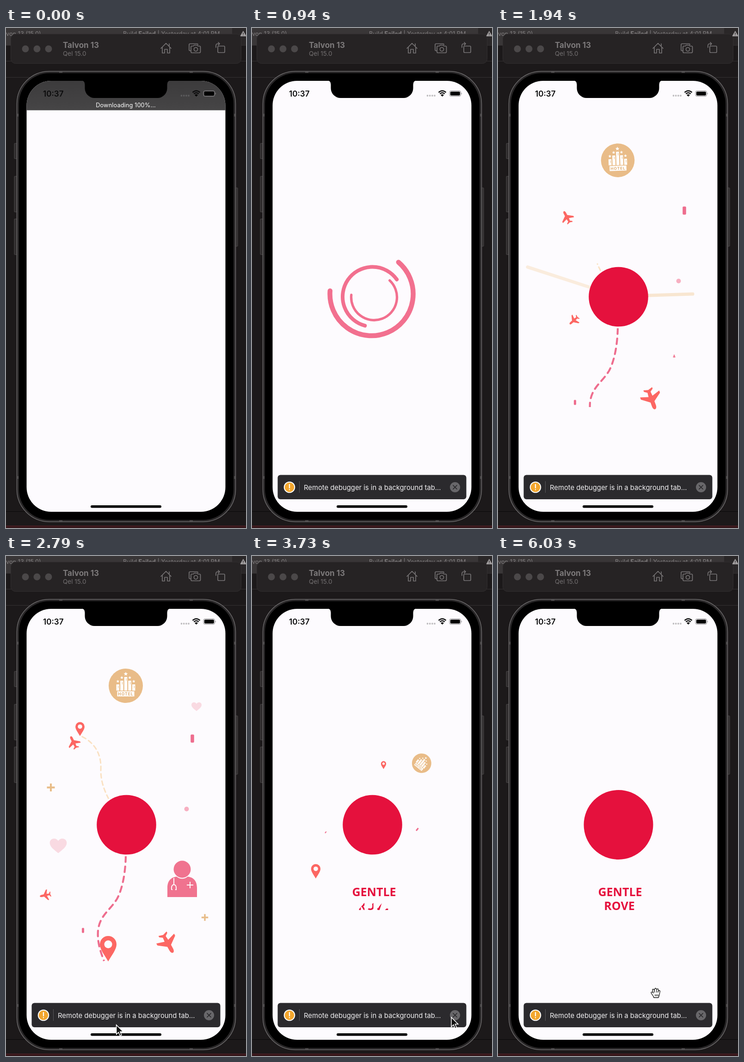
An HTML page for the animation above (6.09 s loop, 519 px wide and 1079 px high).

```html
<!DOCTYPE html>
<html lang="en">
<head>
<meta charset="utf-8">
<title>Splash animation</title>
<style>
  html, body { margin: 0; width: 100%; height: 100%; overflow: hidden; background: #1c191a; }
  svg { display: block; width: 100%; height: 100%; font-family: Inter, Roboto, sans-serif; }
  .brand { font: 700 25px "Open Sans", "Noto Sans", sans-serif; fill: #e5113d; text-anchor: middle; }
</style>
</head>
<body>
<svg viewBox="0 0 519 1079">
  <defs>
    <clipPath id="screen"><rect id="glass" x="44.500" y="114" width="430" height="930" rx="53"/></clipPath>
    <clipPath id="wipe"><path id="wipePath"/></clipPath>
    <mask id="sandMask" maskUnits="userSpaceOnUse" x="0" y="0" width="519" height="1079">
      <path id="sandCut"/>
    </mask>
    <mask id="pinkMask" maskUnits="userSpaceOnUse" x="0" y="0" width="519" height="1079">
      <path id="pinkCut"/>
    </mask>
    <path id="plane" fill="#fc6763" d="M0-23C3-23 4.500-19 4.500-15V-6L22 7V12L4.500 6.500 3.500 16 10 20.500V24L0 21-10 24V20.500L-3.500 16-4.500 6.500-22 12V7L-4.500-6V-15C-4.500-19-3-23 0-23Z"/>
    <path id="pin" fill="#fc6763" fill-rule="evenodd" d="M0 0C-8-14-18-26-18-37A18 18 0 0 1 18-37C18-26 8-14 0 0ZM0-45.500a8.500 8.500 0 1 0 .1 0Z"/>
    <path id="heart" fill="#f9dae2" d="M0 16C-8 9-18 3-18-6C-18-15-6-19 0-10C6-19 18-15 18-6C18 3 8 9 0 16Z"/>
    <path id="plus" fill="#e8bc88" d="M-2-8.500H2V-2H8.500V2H2V8.500H-2V2H-8.500V-2H-2Z"/>
    <linearGradient id="bar" x2="0" y2="1"><stop stop-color="#3c3b3c"/><stop offset="1" stop-color="#464546"/></linearGradient>
  </defs>

  <!-- desktop -->
  <rect width="519" height="1079" fill="#1c191a"/>
  <rect width="489" height="37" fill="#393637"/>
  <rect x="489" width="30" height="37" fill="#2a2728"/>
  <path d="M0 37.500H519M0 71.500H519M0 106.500H519" stroke="#343132"/>
  <path d="M0 1043.500H519" stroke="#090808"/>
  <rect y="1074" width="519" height="5" fill="#35161a"/>
  <path d="M0 1074.500H519" stroke="#5a2228"/>
  <g font-size="12.800" fill="#858283">
    <text x="0" y="17">von 13 (15.0)</text>
    <text x="253" y="17">Build <tspan font-weight="700">Failed</tspan> | Yesterday at 4:01 PM</text>
  </g>
  <path d="M513 6L520 18H506Z" fill="#a09d9e"/>
  <path d="M513 10V14M513 15.500V16.500" stroke="#2a2728" stroke-width="1.300"/>
  <rect x="10.500" y="13" width="498" height="63.500" rx="10" fill="#262324" stroke="#322f30"/>
  <g fill="#4b4849"><circle cx="42" cy="45" r="7.500"/><circle cx="67" cy="45" r="7.500"/><circle cx="92" cy="45" r="7.500"/></g>
  <text x="123" y="42.500" font-size="17" font-weight="700" fill="#7c797a">Talvon 13</text>
  <text x="123" y="60" font-size="13.500" fill="#737071">Qel 15.0</text>
  <g fill="none" stroke="#777475" stroke-width="1.700" stroke-linejoin="round" stroke-linecap="round">
    <path d="M335 44L346 33L357 44M338 42V54H343V46H349V54H354V42M353 39V34"/>
    <path d="M399 49H398Q396 49 396 47V36Q396 34 398 34H413Q415 34 415 36M402 39H405L407 37H413L415 39H418Q420.500 39 420.500 41V51Q420.500 53.500 418 53.500H402Q400 53.500 400 51V41Q400 39 402 39Z"/>
    <circle cx="410.500" cy="46" r="4"/>
    <path d="M460 39H471Q473 39 473 41V51Q473 53 471 53H460Q458 53 458 51V41Q458 39 460 39ZM454 42V38Q454 34 458 34H462M459 31L462 34L459 37"/>
  </g>

  <!-- phone -->
  <g fill="#2f2c2d" stroke="#575455" stroke-width=".8">
    <rect x="18" y="249" width="7" height="33" rx="1"/><rect x="18" y="320" width="7" height="77" rx="1"/>
    <rect x="18" y="412" width="7" height="77" rx="1"/><rect x="494" y="345" width="7" height="126" rx="1"/>
  </g>
  <rect x="23.500" y="93.500" width="473" height="972" rx="70" fill="#282627" stroke="#6c6a6b" stroke-width="1.500"/>
  <path d="M115 95.500H122M397 95.500H404M115 1063.500H122M397 1063.500H404M25.500 185V191M494.500 185V191M25.500 967V973M494.500 967V973" stroke="#494748" stroke-width="3"/>
  <rect x="28" y="97.500" width="464" height="964" rx="66" fill="#000"/>
  <use href="#glass" fill="#fdfbfe"/>

  <g id="header" clip-path="url(#screen)">
    <rect x="44" y="114" width="431" height="63.500" fill="url(#bar)"/>
    <text x="259" y="171" font-size="12.800" fill="#fff" text-anchor="middle" letter-spacing=".1">Downloading 100%...</text>
  </g>

  <path d="M163 113Q170.500 114 170.500 122V130A21 21 0 0 0 191.500 151H327.500A21 21 0 0 0 348.500 130V122Q348.500 114 356 113Z"/>
  <text x="80" y="147.500" font-size="17" font-weight="600" fill="#0b0b0c">10:37</text>
  <g id="dots" fill="#bfbdc0"><circle cx="379.500" cy="146" r="1.900"/><circle cx="384.700" cy="146" r="1.900"/><circle cx="389.900" cy="146" r="1.900"/><circle cx="395" cy="146" r="1.900"/></g>
  <path d="M403.500 139Q411.500 132 419.500 139M406.300 142Q411.500 137.500 416.700 142" fill="none" stroke="#0b0b0c" stroke-width="2.400"/>
  <path d="M408 144.500Q411.500 141.500 415 144.500L411.500 148Z"/>
  <rect x="427" y="135.500" width="24.500" height="12" rx="3.500" fill="none" stroke="#8b898c"/>
  <rect x="428.800" y="137.200" width="21" height="8.600" rx="2"/>
  <path d="M452.800 139.500Q455 141.500 452.800 143.500Z" fill="#8b898c"/>

  <!-- scene -->
  <g clip-path="url(#screen)">
    <g id="rays" stroke="#f4cf9c" stroke-width="7" stroke-linecap="round">
      <path id="rayLeft"/><path id="rayRight"/><path id="rayUp"/>
    </g>
    <g fill="none">
      <path id="sand" mask="url(#sandMask)" stroke="#fae1c2" stroke-width="3" stroke-dasharray="9 7" stroke-linecap="round"/>
      <path id="pink" mask="url(#pinkMask)" stroke="#ee6d8e" stroke-width="4.200" stroke-dasharray="12 10" stroke-linecap="round"/>
    </g>
    <g id="items"></g>
    <g id="arcs" fill="none" stroke="#f2708f" stroke-linecap="round"></g>
    <circle id="disc" cx="260.500" cy="580" fill="#e5113d"/>
    <g clip-path="url(#wipe)" class="brand">
      <text x="264" y="734">GENTLE</text>
      <text x="262.500" y="764">ROVE</text>
    </g>
  </g>

  <rect x="183" y="1030" width="153" height="5.500" rx="2.750"/>
  <g id="toast">
    <rect x="55.500" y="964.500" width="408" height="52.500" rx="6" fill="#2b2a2d"/>
    <circle cx="81" cy="991" r="12.300" fill="#fff"/><circle cx="81" cy="991" r="10.300" fill="#f3a62d"/>
    <path d="M81 985V992.500M81 996V996.500" stroke="#fff" stroke-width="2.200" stroke-linecap="round"/>
    <path d="M102.500 978V1003" stroke="#59585b"/>
    <text x="112" y="996.500" font-size="14.800" fill="#f1f0f2">Remote debugger is in a background tab...</text>
    <circle cx="439" cy="991" r="11" fill="#68676a"/>
    <path d="M435 987L443 995M443 987L435 995" stroke="#262528" stroke-width="1.700" stroke-linecap="round"/>
  </g>

  <g id="tip">
    <path d="M328 1018.500H433Q438 1018.500 438 1023.500V1046Q438 1051 433 1051H390L381 1061L372 1051H328Q323 1051 323 1046V1023.500Q323 1018.500 328 1018.500Z" fill="#777577" fill-opacity=".62" stroke="#777577" stroke-opacity=".5"/>
    <text x="379.500" y="1041" font-size="16.500" fill="#fff" text-anchor="middle">Kit Shelf</text>
  </g>
  <path id="arrow" d="M0 0V20.500L4.700 16 7.900 23.500 11.300 22 8.200 14.700H14.700Z" fill="#111" stroke="#fff" stroke-width="1.500"/>
  <path id="hand" transform="translate(341 943)" d="M-4 10C-5 5-10 2-10-1C-9-3-7-2-5 0L-7-6C-7-9-4-9-3-6L-2-8C-2-11 1-11 2-8L3-8C4-10 6-9 6-6L7-5C9-6 10-4 9-2L8 4L6 10ZM-3-6L-2-1M2-8V-1M6-6L5-1M-1 3V7M2 3V7M5 3V7" fill="#fff" stroke="#111" stroke-width="1.300" stroke-linejoin="round"/>
</svg>

<script>
const LOOP = 6090, CX = 260.5, CY = 580;
const el = id => document.getElementById(id);
const set = (node, attrs) => { for (const k in attrs) node.setAttribute(k, attrs[k]); };
const show = (node, on) => node.setAttribute("visibility", on ? "visible" : "hidden");
const clamp = x => Math.min(1, Math.max(0, x));
const span = (t, a, b) => clamp((t - a) / (b - a));
const mix = (a, b, p) => a + (b - a) * p;
const out = p => 1 - (1 - p) ** 3;
const smooth = p => p * p * (3 - 2 * p);
const back = p => 1 + 2.7 * (p - 1) ** 3 + 1.7 * (p - 1) ** 2;

// Piecewise interpolation through [time, ...values] stops
function track(t, stops, ease = p => p) {
  let i = 0;
  while (i < stops.length - 2 && t > stops[i + 1][0]) i++;
  const [a, b] = [stops[i], stops[i + 1]];
  const p = ease(span(t, a[0], b[0]));
  return a.slice(1).map((v, k) => mix(v, b[k + 1], p));
}

function make(markup) {
  const g = document.createElementNS("http://www.w3.org/2000/svg", "g");
  g.innerHTML = markup;
  el("items").append(g);
  return g;
}
const use = id => `<use href="#${id}"/>`;
const bar = (w, h) => `<rect x="${-w / 2}" y="${-h / 2}" width="${w}" height="${h}" rx="2" fill="#ee6d8e"/>`;

function star(x, y, r) {
  const pts = Array.from({ length: 10 }, (_, i) => {
    const a = i * Math.PI / 5, q = i % 2 ? r * .45 : r;
    return `${x + q * Math.sin(a)},${y - q * Math.cos(a)}`;
  });
  return `<polygon points="${pts.join(" ")}" fill="#fff"/>`;
}
function badge() {
  let s = '<circle r="37" fill="#e9bc88"/>';
  [-3, -11, -19, -11, -3].forEach((top, i) => {
    const x = (i - 2) * 8.6;
    s += `<rect x="${x - 3.2}" y="${top}" width="6.4" height="${10.5 - top}" fill="#fff"/>` +
      `<path d="M${x + 1} ${top + 3}V${top + 8}" stroke="#e9bc88"/>` + star(x, top - 6.5, i === 2 ? 4.6 : 3.6);
  });
  return s + '<rect x="-18.5" y="12" width="37" height="11" fill="#fff"/><text y="20.8" font-size="8.5" font-weight="700" letter-spacing="1" text-anchor="middle" fill="#e0ad72">HOTEL</text>';
}
const doctor = `<path d="M-32 27V7C-32-10-22-16-12-17Q0-8 12-17C22-16 32-10 32 7V27Z" fill="#f0738f"/>
  <circle cy="-33" r="18.5" fill="#f0738f"/>
  <path d="M-18-14V0M-23 11V7C-23-2-13-2-13 7V11H-15M-23 11H-21M17-6V8M10 1H24" fill="none" stroke="#fff" stroke-width="1.9"/>`;

// Launched from the centre, later spiralling back into it
const flung = [
  { g: make(badge()), x: 259, y: 280, from: 1500, to: 2100, turn: 1, tilt: -100 },
  { g: make(bar(7.5, 17.5)), x: 403, y: 394, from: 1420, to: 1860, turn: 1.5, tilt: 0 },
  { g: make(bar(5, 11)), x: 166.5, y: 808, from: 1420, to: 1860, turn: 1.5, tilt: 0 }
];
// Popping up in place: x, y, scale, start, kept until the spiral
const pops = [
  ["pin", 160, 388.5, .55, 2330, true], ["pin", 221, 875, 1, 2250, true],
  ["heart", 412, 325, .61, 2250], ["heart", 113, 625, 1.02, 2160],
  ["plus", 97, 499.5, 1, 2200], ["plus", 430, 780, .85, 2300],
  [null, 381, 709, 1, 1935]
].map(([id, x, y, s, from, keep]) => ({ g: make(id ? use(id) : doctor), x, y, s, from, keep }));
const dot = make('<circle r="5" fill="#f7afc1"/>');
// Stops: time, x, y, heading, scale
const planes = [
  [[1500, CX, CY, -35, 0], [1940, 149, 408, -28, .62], [2790, 146, 402, -26, .62], [3220, 143, 396, -24, 0]],
  [[1560, CX, CY, 235, 0], [1940, 164, 631, 228, .52], [2790, 85, 732, 258, .52], [3220, 77, 735, 265, 0]],
  [[1500, CX, CY, 170, 0], [1940, 332, 801, 160, 1], [2790, 350, 836, 151, 1], [3220, 357, 848, 148, 0]]
].map(stops => ({ g: make(use("plane")), stops }));

const routes = [
  ["sand", "M222 524C211 503 205 484 205 462C207 425 190 402 163 389", 1880, 2420],
  ["pink", "M259 648C258 690 250 722 240 740C225 765 203 775 199 808C197 835 205 855 212 874", 1560, 2060]
];
for (const [id, d] of routes) {
  set(el(id), { d });
  set(el(id + "Cut"), { d, fill: "none", stroke: "#fff", "stroke-width": 9, pathLength: 1, "stroke-dasharray": "1 2" });
}

// Centre, radius, start angle, sweep, direction, weight
const arcs = [
  [258.5, 574, 90, -50, 234, 1, 10.5], [260.5, 580, 64.5, -35, -220, -1, 8], [264, 581, 49.5, -47.5, 233, 1, 5.3]
].map(a => {
  const path = document.createElementNS("http://www.w3.org/2000/svg", "path");
  set(path, { "stroke-width": a[6] });
  el("arcs").append(path);
  return [path, ...a];
});
function arcPath(cx, cy, r, start, sweep) {
  const pt = deg => `${cx + r * Math.cos(deg * Math.PI / 180)} ${cy + r * Math.sin(deg * Math.PI / 180)}`;
  return `M${pt(start)}A${r} ${r} 0 ${+(Math.abs(sweep) > 180)} ${+(sweep > 0)} ${pt(start + sweep)}`;
}

function place(g, x, y, angle, s) {
  show(g, s > .005);
  set(g, { transform: `translate(${x} ${y}) rotate(${angle}) scale(${s})` });
}
function spiral(x, y, k, turn) {
  const a = k * turn * Math.PI / 2, s = 1 - Math.min(1, k * (1 + (turn - 1) * .7));
  const dx = x - CX, dy = y - CY, c = Math.cos(a), n = Math.sin(a);
  return [CX + s * (dx * c - dy * n), CY + s * (dx * n + dy * c), s];
}

// Diagonal wipe of equal cells, one per letter
function cells(x, base, w, n, p) {
  let d = "";
  const h = 23, q = Math.min(1, 2 * p), r = Math.max(0, 2 * p - 1), b = base + 2;
  for (let i = 0; i < n; i++) {
    const e = x + (i + 1) * w;
    d += `M${e - w * q} ${b}H${e}V${b - h * q}H${e - w * r}Z`;
  }
  return d;
}

function drawSpinner(t) {
  const grow = out(span(t, 400, 900)), shrink = smooth(span(t, 1180, 1480));
  show(el("arcs"), t > 400 && t < 1480);
  for (const [path, cx, cy, r, start, sweep, dir] of arcs) {
    const len = sweep * grow * (1 - shrink);
    const a = start + dir * (t - 940) * .36 + sweep * shrink;
    set(path, { d: arcPath(cx, cy, r * mix(.75, 1, grow), a, len || .01) });
  }
}

function drawRays(t) {
  show(el("rays"), t > 1380 && t < 2300);
  const [l, r, u] = track(t, [[1380, 215, 310, 525], [1480, 150, 365, 438], [1940, 64, 421, 330], [2250, 49, 434, 320]]);
  const fade = 1 - span(t, 1640, 2250);
  set(el("rayLeft"), { d: `M200 560L${l} ${560 - (200 - l) * .324}`, opacity: fade * .65 });
  set(el("rayRight"), { d: `M315 577.5L${r} ${577.5 - (r - 315) * .032}`, opacity: fade * .9 });
  set(el("rayUp"), { d: `M260 520V${u}`, opacity: 1 - span(t, 1480, 1700) });
}

function drawItems(t) {
  const k = span(t, 3150, 4000) ** 2.2, leave = 1 - smooth(span(t, 2860, 3220));
  for (const f of flung) {
    const p = out(span(t, f.from, f.to)), [x, y, s] = spiral(f.x, f.y, k, f.turn);
    place(f.g, mix(CX, x, p), mix(CY, y, p), f.tilt * (1 - p) + k * 90, s * p);
  }
  for (const o of pops) {
    const p = t < o.from ? 0 : back(span(t, o.from, o.from + 360));
    const [x, y, s] = o.keep ? spiral(o.x, o.y, k, 1) : [o.x, o.y, leave];
    place(o.g, x, y, 0, o.s * p * s);
  }
  const dp = out(span(t, 1420, 1860));
  place(dot, mix(CX, 390.5, dp), mix(CY, 546, dp), 0, dp * leave);
  for (const { g, stops } of planes) {
    const ease = t < 1940 ? out : p => p;
    place(g, ...track(t, stops, ease));
  }
  for (const [id, , from, to] of routes) {
    const p = span(t, from, to) * leave;
    show(el(id), p > 0);
    set(el(id + "Cut"), { "stroke-dashoffset": 1 - p });
  }
}

function drawPointer(t) {
  show(el("arrow"), t >= 2760 && t < 4300);
  const [x, y] = track(t, [[2760, 236, 1011], [2800, 239, 1012], [3020, 305, 1066], [3200, 380, 1060], [3330, 416, 1030],
    [3390, 431, 1022], [3520, 431, 1021], [3800, 431, 991]], smooth);
  set(el("arrow"), { transform: `translate(${x} ${y})` });
  show(el("tip"), t >= 3210 && t < 3360);
  show(el("hand"), t >= 6030);
}

function render(t) {
  const head = 1 - span(t, 270, 450);
  set(el("header"), { opacity: head });
  set(el("dots"), { fill: head > .5 ? "#5c5b5d" : "#bfbdc0" });
  show(el("toast"), t >= 360);
  drawSpinner(t);
  drawRays(t);
  drawItems(t);
  const r = 64.3 * (t < 1220 ? 0 : back(span(t, 1220, 1520))) + 10.7 * out(span(t, 4270, 4680));
  set(el("disc"), { r: Math.max(0, r) });
  set(el("wipePath"), {
    d: cells(211, 734, 17.7, 6, span(t, 3180, 3500)) + cells(224, 764, 19.3, 4, span(t, 3520, 4060))
  });
  drawPointer(t);
}

const start = performance.now();
function tick() {
  render((performance.now() - start) % LOOP);
  requestAnimationFrame(tick);
}
tick();
</script>
</body>
</html>
```
